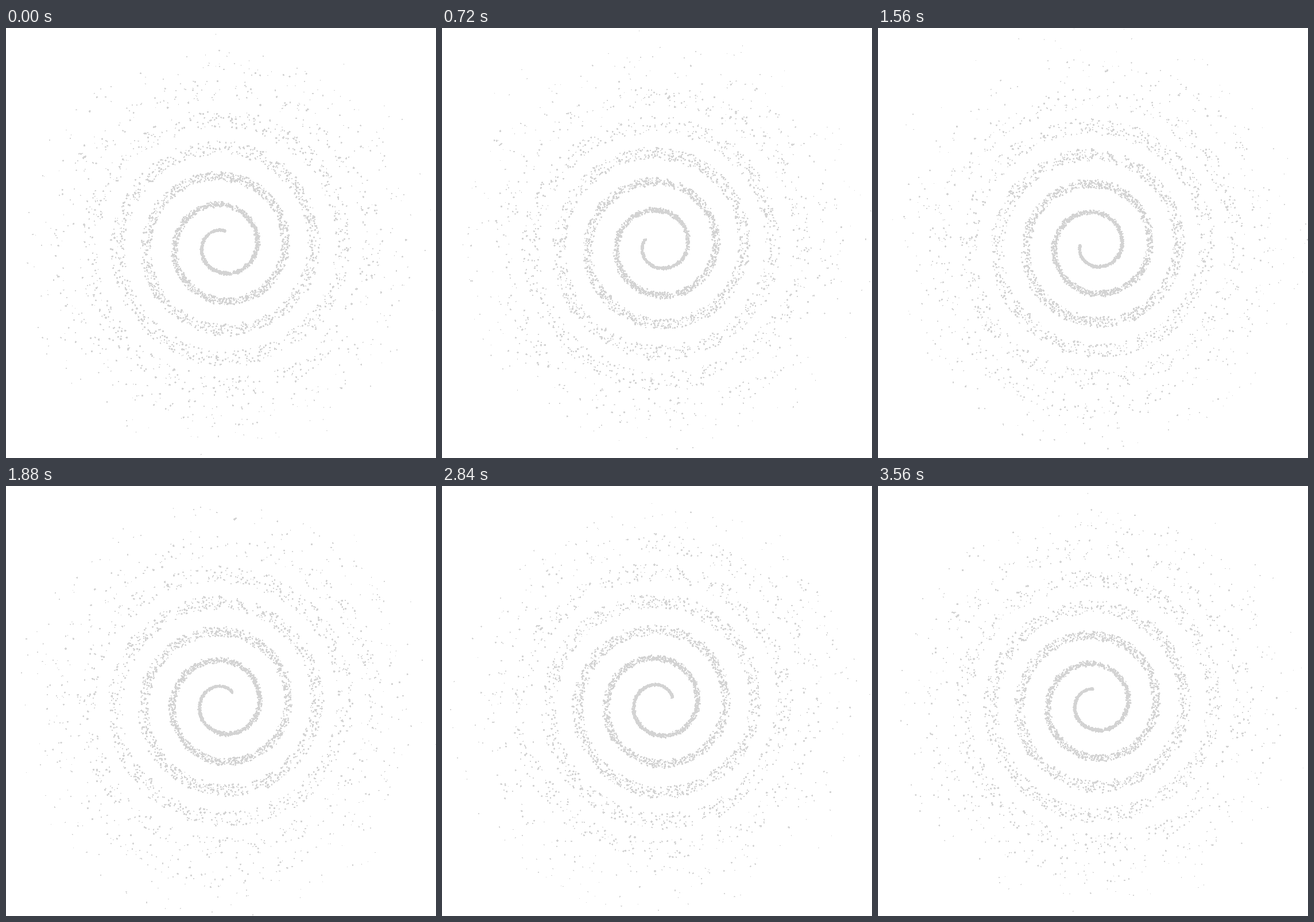
An HTML page with a canvas that plays this animation: 749x748 px, repeating every 3.6 s.

```html
<!DOCTYPE html>
<html lang="en">
<head>
<meta charset="utf-8">
<title>Spiral of dots</title>
<style>
  html, body { margin: 0; width: 100%; height: 100%; overflow: hidden; background: #fff; }
  canvas { display: block; }
</style>
</head>
<body>
<canvas id="stage" width="749" height="748"></canvas>
<script>
const ctx = document.getElementById('stage').getContext('2d');
const STEP = 40;            // ms per step
const STEPS = 90;           // steps per loop
const TURN = Math.PI * 2 * 4 / STEPS;
const START = -Math.PI / 2 + 0.17;
const CENTER = { x: 378, y: 379 };
const SPEED = 2.22;
const PER_STEP = 42;

function seeded(a) {
  return () => {
    a = (a + 0x6D2B79F5) | 0;
    let t = Math.imul(a ^ (a >>> 15), 1 | a);
    t = (t + Math.imul(t ^ (t >>> 7), 61 | t)) ^ t;
    return ((t ^ (t >>> 14)) >>> 0) / 4294967296;
  };
}

const rnd = seeded(11);
const spread = (n) => (rnd() * 2 - 1) * n;

const dots = Array.from({ length: STEPS * PER_STEP }, () => {
  const born = rnd() * STEPS;
  const angle = START + TURN * born;
  return {
    born,
    dx: Math.cos(angle),
    dy: Math.sin(angle),
    speed: SPEED * (1 + spread(0.075)),
    offset: spread(1.8),
    size: 0.9 + rnd() * 0.95,
    life: 50 + rnd() * 110
  };
});

// Hard-edged disc, filled row by row
function disc(x, y, r) {
  for (let row = Math.ceil(y - r - 0.5); row + 0.5 <= y + r; row++) {
    const d = row + 0.5 - y;
    const half = Math.sqrt(Math.max(0, r * r - d * d));
    const left = Math.ceil(x - half - 0.5);
    const right = Math.floor(x + half - 0.5) + 1;
    if (right > left) ctx.fillRect(left, row, right - left, 1);
  }
}

function drawDot(dot, age) {
  const dist = 20 + dot.offset + dot.speed * age + 6 * Math.exp(-age / 8);
  const size = dot.size * Math.min(1, 0.55 + (dot.life - age) / 50);
  disc(CENTER.x + dot.dx * dist, CENTER.y + dot.dy * dist, size);
}

function draw(step) {
  ctx.fillStyle = '#fff';
  ctx.fillRect(0, 0, 749, 748);
  ctx.fillStyle = '#d3d3d3';
  for (const dot of dots) {
    const first = (step - dot.born + STEPS) % STEPS;
    for (let age = first; age < dot.life; age += STEPS) drawDot(dot, age);
  }
}

let shown = -1;
const origin = performance.now();
function tick() {
  const step = Math.floor((performance.now() - origin) / STEP) % STEPS;
  if (step !== shown) draw(shown = step);
  requestAnimationFrame(tick);
}
tick();
</script>
</body>
</html>
```
